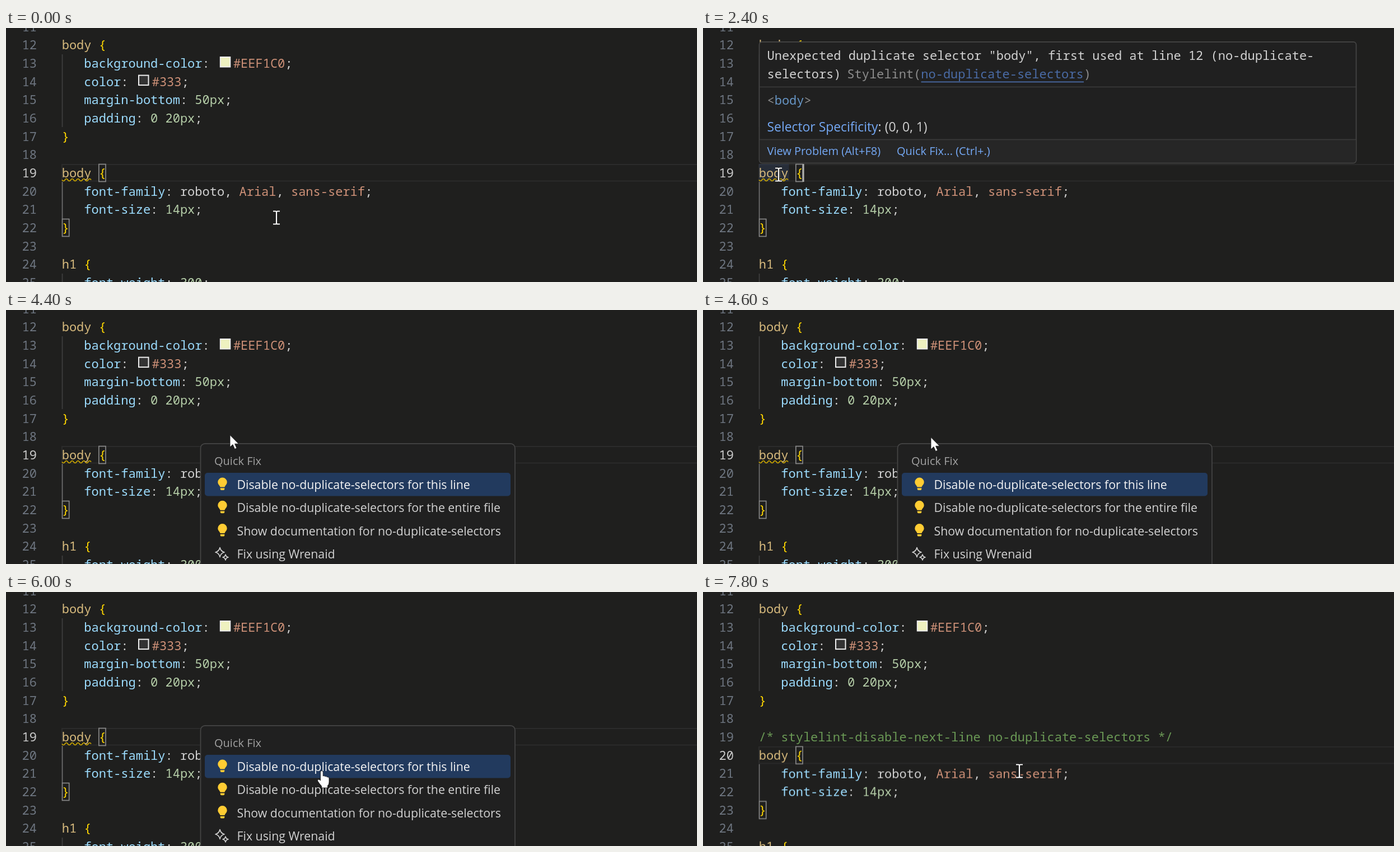
Write an HTML page that moves like this. It is 1234 px wide and 454 px high and loops after 8000 ms.

```html
<!DOCTYPE html>
<html lang="en">
<head>
<meta charset="utf-8">
<title>Quick fix for a duplicate selector</title>
<style>
html, body { margin: 0; width: 100%; height: 100%; overflow: hidden; background: #1f1f1e; }
svg { display: block; width: 1234px; height: 454px; }
text { white-space: pre; fill: #d2d2d2; }
.mono { font: 500 22px "Noto Sans Mono", monospace; }
.ui { font: 20px "Open Sans", sans-serif; }
.ui .item { font-size: 21.32px; }
.ui .big { font-size: 22.9px; }

.sel { fill: #d7ba7d; }
.prop { fill: #9cdcfe; }
.num { fill: #b5cea8; }
.str { fill: #ce9178; }
.brace { fill: #ffd700; }
.comment { fill: #6a9955; }
.dim { fill: #8d8d8d; }
.title { fill: #a2a2a2; }
.tag { fill: #6796c6; }
.link { fill: #75a9f5; }
.rule { fill: #4a6ba5; }
.no { fill: #6e7681; text-anchor: end; }

.guide { fill: #404040; }
.guide.on { fill: #707070; }
.match { fill: none; stroke: #888; stroke-width: 1.7; }
.panel { fill: #202020; stroke: #454545; stroke-width: 1.7; }
.swatch { stroke: #eee; stroke-width: 2; }

.tail, .before, .after, .popup, .menu, .typing, .no19, .no20, .ibeam, .arrow, .hand {
  animation: 8s step-end infinite;
}
.tail { animation-name: shift; }
.before { animation-name: before; }
.after { animation-name: after; }
.popup { animation-name: popup; }
.menu { animation-name: menu; }
.typing { animation-name: typing; }
.no19 { animation-name: no19; }
.no20 { animation-name: no20; }
.ibeam { animation-name: ibeam; }
.arrow { animation-name: arrow; }
.hand { animation-name: hand; }
.caret { animation: blink 1s step-end infinite; }
.pointer { animation: move 8s step-end infinite; }

@keyframes shift { 0% { transform: none } 95%, 100% { transform: translateY(32.67px) } }
@keyframes before { 0% { opacity: 1 } 95%, 100% { opacity: 0 } }
@keyframes after { 0% { opacity: 0 } 95%, 100% { opacity: 1 } }
@keyframes popup { 0% { opacity: 0 } 27.5% { opacity: 1 } 52.5%, 100% { opacity: 0 } }
@keyframes menu { 0% { opacity: 0 } 52.5% { opacity: 1 } 95%, 100% { opacity: 0 } }
@keyframes typing { 0% { opacity: 1 } 52.5%, 100% { opacity: 0 } }
@keyframes no19 { 0% { fill: #ccc } 95%, 100% { fill: #6e7681 } }
@keyframes no20 { 0% { fill: #6e7681 } 95%, 100% { fill: #ccc } }
@keyframes blink { 0% { opacity: 0 } 30% { opacity: 1 } 80%, 100% { opacity: 0 } }
@keyframes ibeam { 0% { opacity: 1 } 32.5% { opacity: 0 } 95%, 100% { opacity: 1 } }
@keyframes arrow {
  0% { opacity: 0 } 32.5% { opacity: 1 } 50% { opacity: 0 }
  52.5% { opacity: 1 } 70%, 100% { opacity: 0 }
}
@keyframes hand {
  0% { opacity: 0 } 50% { opacity: 1 } 52.5% { opacity: 0 }
  70% { opacity: 1 } 95%, 100% { opacity: 0 }
}
/* The screen refreshes every 200 ms, so the pointer moves in steps. */
@keyframes move {
  0% { transform: translate(483px, 339px) }
  5% { transform: translate(483px, 339px); animation-timing-function: steps(5) }
  17.5% { transform: translate(317px, 290px); animation-timing-function: steps(3) }
  25% { transform: translate(135px, 262px) }
  30% { transform: translate(135px, 262px); animation-timing-function: steps(2) }
  35% { transform: translate(200px, 212px); animation-timing-function: steps(3) }
  42.5% { transform: translate(403px, 242px) }
  45% { transform: translate(403px, 242px); animation-timing-function: steps(2) }
  50% { transform: translate(400px, 224px) }
  57.5% { transform: translate(407px, 228px) }
  62.5% { transform: translate(407px, 228px); animation-timing-function: steps(3) }
  70%, 100% { transform: translate(565px, 320px) }
}
</style>
</head>
<body>
<svg viewBox="0 0 1234 454">
  <defs>
    <g id="bulb" fill="#fc3">
      <path d="M-4 5.500C-4.300 3-8.200 1-8.200-3.300A8.200 8.200 0 0 1 8.200-3.300C8.200 1 4.300 3 4 5.500Z"/>
      <path d="M-3.800 7.200H3.800V8.800Q3.800 11 1.800 11H-1.800Q-3.800 11-3.800 8.800Z"/>
    </g>
    <path id="beam" d="M-6-11.500H-2Q0-11.500 0-9.500Q0-11.500 2-11.500H6M0-10V10M-6 11.500H-2Q0 11.500 0 9.500Q0 11.500 2 11.500H6"/>
  </defs>

  <g class="mono" id="numbers"></g>
  <g class="mono" id="head">
    <rect class="guide" x="99.700" y="47" width="1.700" height="130"/>
    <rect class="swatch" x="382.800" y="52" width="17.500" height="17.500" fill="#eef1c0"/>
    <rect class="swatch" x="237" y="84.600" width="17.500" height="17.500" fill="#333"/>
  </g>
  <g class="mono after" id="note"></g>

  <g class="mono tail" id="tail">
    <rect x="100" y="244" width="1140" height="29.500" fill="none" stroke="#2b2b2b" stroke-width="2"/>
    <rect class="popup" x="100" y="243" width="53.500" height="31" fill="#3c5078" fill-opacity=".3"/>
    <rect class="guide on" x="99.700" y="275" width="1.700" height="66"/>
    <rect class="guide" x="99.700" y="439" width="1.700" height="20"/>
    <rect class="match" x="165.800" y="243.500" width="12.200" height="31"/>
    <rect class="match" x="100.500" y="341.500" width="12.200" height="31"/>
    <path class="before" id="squiggle" fill="none" stroke="#cca700" stroke-width="1.700"/>
    <g class="typing"><rect class="caret" x="177.800" y="243" width="2.800" height="32" fill="#aeafad"/></g>
  </g>

  <g class="popup">
    <rect class="panel" x="100.500" y="24.800" width="1066" height="216.500" rx="5"/>
    <path d="M101.400 199H1165.700V236Q1165.700 240.400 1161.500 240.400H105.500Q101.400 240.400 101.400 236Z" fill="#262626"/>
    <path d="M101 105.300H1166M101 199.300H1166" stroke="#383838" stroke-width="1.700"/>
    <g class="mono">
      <text x="114.500" y="57">Unexpected duplicate selector "body", first used at line 12 (no-duplicate-</text>
      <text x="114.500" y="89.500">selectors)</text>
      <text class="dim" x="257.300" y="89.500">Stylelint(<tspan class="rule">no-duplicate-selectors</tspan>)</text>
      <rect x="389.500" y="95.500" width="290.500" height="1.800" class="rule"/>
      <text class="dim" x="114.500" y="137">&lt;<tspan class="tag">body</tspan>&gt;</text>
    </g>
    <g class="ui">
      <text class="big" x="114.500" y="185"><tspan class="link">Selector Specificity</tspan>: (0, 0, 1)</text>
      <text class="link" x="114.500" y="227">View Problem (Alt+F8)</text>
      <text class="link" x="346" y="227">Quick Fix... (Ctrl+.)</text>
    </g>
  </g>

  <g class="menu ui" id="menu">
    <rect class="panel" x="347.500" y="238.800" width="561.500" height="240" rx="8"/>
    <text class="title" x="372" y="276.500">Quick Fix</text>
    <rect x="355" y="291" width="546" height="41.500" rx="5" fill="#223a5e"/>
    <g fill="none" stroke="#ccc" stroke-width="1.700" stroke-linejoin="round" stroke-linecap="round">
      <path d="M382 424.500Q383.500 431.500 390 433Q383.500 434.500 382 441.500Q380.500 434.500 374 433Q380.500 431.500 382 424.500Z"/>
      <path d="M392 437Q392.800 441.200 397 442Q392.800 442.800 392 447Q391.200 442.800 387 442Q391.200 441.200 392 437Z"/>
    </g>
  </g>

  <g class="pointer">
    <g class="ibeam" fill="none">
      <use href="#beam" stroke="#111" stroke-width="4.200"/>
      <use href="#beam" stroke="#fff" stroke-width="2.200"/>
    </g>
    <path class="arrow" d="M0-.5V21L5 16.500L8.500 24.500L12 23L8.600 15.200H15.500Z" fill="#fff" stroke="#111" stroke-width=".8"/>
    <path class="hand" d="M-3.500 2Q-3.500-.5-1.200-.5T1.200 2V9Q3.300 7.500 4.800 9.700Q7 8.500 8.300 10.800Q12 10 12 14V20Q12 24 9.500 26V30H-1.500V27Q-5 23-8 18.500Q-9.500 15.500-7 15Q-5 15-3.500 17Z" fill="#fff" stroke="#111" stroke-width=".8"/>
  </g>
</svg>
<script>
const CHAR = 13.2, LEFT = 99.7, ROW = 32.67;
const $ = id => document.getElementById(id);
const baseline = row => 38.3 + (row - 12) * ROW;

function make(parent, name, attrs, content = "") {
  const el = document.createElementNS("http://www.w3.org/2000/svg", name);
  for (const key in attrs) el.setAttribute(key, attrs[key]);
  el.textContent = content;
  return parent.appendChild(el);
}

// Parts are [class, text] pairs, or plain strings for punctuation.
function line(group, row, indent, ...parts) {
  const text = make($(group), "text", { x: LEFT + indent * CHAR, y: baseline(row) });
  for (const part of parts) {
    const [cls, str] = Array.isArray(part) ? part : ["", part];
    make(text, "tspan", { class: cls }, str);
  }
}

const open = (group, row, name) => line(group, row, 0, ["sel", name + " "], ["brace", "{"]);
const close = (group, row) => line(group, row, 0, ["brace", "}"]);
const rule = (group, row, name, ...value) => line(group, row, 3, ["prop", name], ": ", ...value, ";");

function color(row, name, value) {
  line("head", row, 3, ["prop", name], ":");
  // The swatch pushes the value to the right.
  const x = LEFT + (name.length + 5) * CHAR + 29;
  const text = make($("head"), "text", { x, y: baseline(row) });
  make(text, "tspan", { class: "str" }, value);
  make(text, "tspan", {}, ";");
}

for (let n = 11; n <= 25; n++)
  make($("numbers"), "text", { x: 55, y: baseline(n), class: `no no${n}` }, n);

open("head", 12, "body");
color(13, "background-color", "#EEF1C0");
color(14, "color", "#333");
rule("head", 15, "margin-bottom", ["num", "50px"]);
rule("head", 16, "padding", ["num", "0 20px"]);
close("head", 17);

line("note", 19, 0, ["comment", "/* stylelint-disable-next-line no-duplicate-selectors */"]);

open("tail", 19, "body");
rule("tail", 20, "font-family", "roboto, ", ["str", "Arial"], ", ", ["str", "sans-serif"]);
rule("tail", 21, "font-size", ["num", "14px"]);
close("tail", 22);
open("tail", 24, "h1");
rule("tail", 25, "font-weight", ["num", "300"]);

let wave = "M100 271.5q2.6 4 5.2 0";
for (let x = 110.4; x < 154; x += 5.2) wave += `T${x} 271.5`;
$("squiggle").setAttribute("d", wave);

[
  "Disable no-duplicate-selectors for this line",
  "Disable no-duplicate-selectors for the entire file",
  "Show documentation for no-duplicate-selectors",
  "Fix using Wrenaid"
].forEach((label, i) => {
  const y = 320 + i * 41.3;
  make($("menu"), "text", { class: "item", x: 412.5, y, style: i ? "" : "fill:#f4f4f4" }, label);
  if (i < 3) make($("menu"), "use", { href: "#bulb", x: 386.5, y: y - 9 });
});
</script>
</body>
</html>
```
